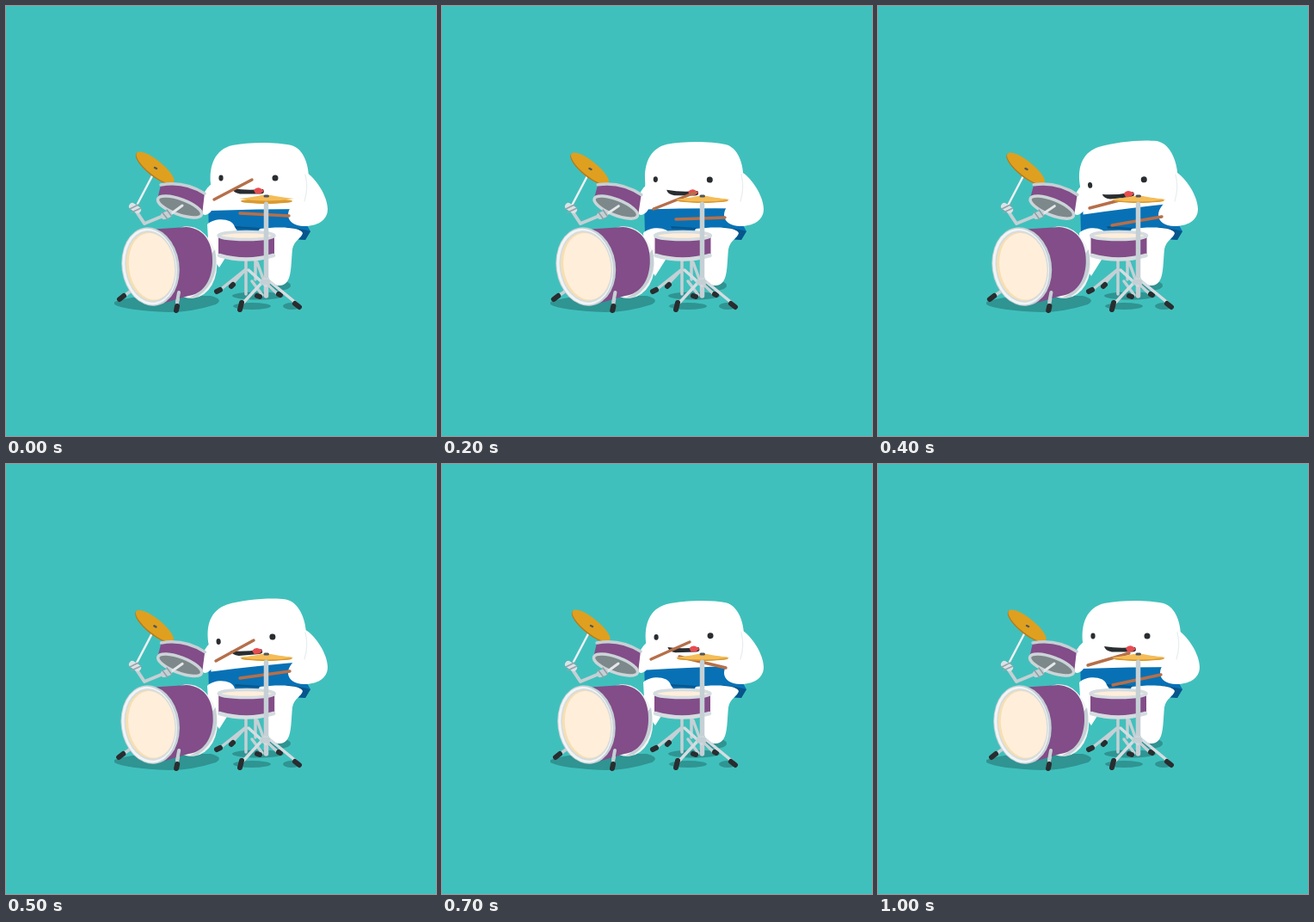
Write an HTML page that moves like this. It is 500 by 500 pixels and loops after 1.1 s.

```html
<!DOCTYPE html>
<html lang="en">
<head>
<meta charset="utf-8">
<title>Drummer</title>
<style>
  html, body { margin: 0; width: 100%; height: 100%; overflow: hidden; background: #40c0bc; }
  svg { display: block; width: 100vw; height: 100vh; }
  .line { fill: none; stroke-linecap: round; stroke-linejoin: round; }
  .steel { stroke: #c5d0d5; }
  .foot { stroke: #292d30; stroke-width: 6; }
  .stick { stroke: #b66f49; stroke-width: 3.4; }
  .fold { stroke: #e8eef0; stroke-width: 1.3; }
  .shell { fill: #824d88; }
</style>
</head>
<body>
<svg viewBox="0 0 500 500">
  <g fill="#2f9492">
    <path d="M126 344Q150 335 200 337H238Q254 341 244 347Q216 356 190 356Q138 354 126 347Z"/>
    <ellipse cx="293" cy="337" rx="30" ry="4.5"/>
    <ellipse cx="317" cy="325" rx="14" ry="6"/>
    <ellipse cx="286" cy="349" rx="22" ry="4"/>
    <ellipse cx="332" cy="349" rx="10" ry="4"/>
  </g>

  <g id="shorts">
    <path fill="#0871b5" d="M235 228H335L354 262L348 272L310 270L236 266Z"/>
    <path fill="#07568b" d="M326 257Q344 259 354 262L348 272L339 271Q345 265 326 260ZM266 256L296 258V260L267 259Z"/>
  </g>
  <path fill="#fff" d="M295 259C318 256 343 257 345 264C344 270 335 272 333 283C331 303 333 325 318 325C307 325 304 317 302 300L290 270Z"/>
  <path id="thigh" fill="#fff" d="M234 254C242 246 263 246 266 257L272 266L248 304L236 288Z"/>

  <path id="head" fill="#fff" d="M238 207C236 185 243 167 263 162C284 158 314 158 332 162C346 166 353 185 352 205L348 236Q290 236 238 238Z"/>
  <path fill="#fff" d="M241 206C231 211 226 224 226 238C228 245 235 244 239 238L252 213Z"/>
  <g id="face">
    <g id="open" fill="#292d30">
      <ellipse cx="250" cy="200" rx="2.6" ry="3.4"/>
      <ellipse cx="313" cy="200" rx="3.5" ry="3.5"/>
    </g>
    <path id="shut" class="line" stroke="#292d30" stroke-width="2" d="M247 200L253 201M309 200L317 201"/>
    <path fill="#292d30" d="M263 212Q280 215 299 213Q302 218 296 218.500H272Q264 217 263 212Z"/>
    <path fill="#e64c50" d="M288 214Q293 208 300 215L296 218H290Z"/>
  </g>
  <g id="arm">
    <path fill="#fff" d="M347 192C361 200 374 222 374 236C374 250 361 256 347 256C335 256 328 250 328 243C328 235 335 229 341 223Z"/>
    <path class="line fold" d="M348 196Q352 211 347 227"/>
  </g>
  <path id="left" class="line stick"/>
  <path id="right" class="line stick"/>

  <g id="crash">
    <path class="line" stroke="#eef1f3" stroke-width="2.5" d="M174 190L153 230"/>
    <g transform="rotate(39 173.500 188)">
      <ellipse cx="173.500" cy="189" rx="27.500" ry="9" fill="#b87918"/>
      <ellipse cx="173.500" cy="188" rx="27.500" ry="8.500" fill="#dfa01f"/>
    </g>
    <path class="line" stroke="#50585c" stroke-width="2.5" d="M173 188L175 189"/>
  </g>
  <path class="line steel" stroke-width="4" d="M149 235L161 253L190 241"/>
  <path class="line" stroke="#dce2e5" stroke-width="8" d="M147 233L153 237"/>
  <path class="line" stroke="#96a3aa" stroke-width="1.5" d="M144 236L154 231M146 240L157 235"/>

  <g id="tom">
    <path class="shell" d="M180 208Q207 203 231 217L228 243L176 225Z"/>
    <path class="line steel" stroke-width="3.5" d="M180 208Q207 203 231 218"/>
    <ellipse cx="202" cy="233.500" rx="27" ry="9" transform="rotate(20 202 233.500)" fill="#7d888b" stroke="#ccd4d8" stroke-width="3.5"/>
    <path class="line" stroke="#e4e8ea" stroke-width="3" d="M205 232L190 243"/>
    <path class="line steel" stroke-width="8" d="M184 244L189 242"/>
    <path class="line" stroke="#929fa5" stroke-width="1.5" d="M181 239L188 248M187 237L193 245"/>
  </g>

  <g id="kick">
    <path class="line steel" stroke-width="4" d="M147 330L136 338M202 328L199 346"/>
    <path class="line foot" d="M137 337L132 341M199 349L198 354"/>
    <ellipse cx="213" cy="298" rx="32" ry="42" transform="rotate(-8 213 298)" fill="#f2f4f5"/>
    <path fill="#c5d0d5" d="M243 283Q250 319 223 338L212 340Q242 326 239 288Z"/>
    <path class="shell" d="M165 260L210 257C232 259 241 277 240 299C239 321 228 335 212 337L175 348Z"/>
    <g transform="rotate(-8 168 303)">
      <ellipse cx="168" cy="303" rx="33.500" ry="46" fill="#c5d0d5"/>
      <ellipse cx="167" cy="303" rx="31.500" ry="44.500" fill="#f2f4f5"/>
      <ellipse cx="168" cy="303" rx="29.500" ry="42" fill="#d5dce0"/>
      <ellipse cx="168" cy="303" rx="28" ry="40" fill="#f7dfb0"/>
      <ellipse cx="169.500" cy="303" rx="26.500" ry="39" fill="#ffeeda"/>
    </g>
    <path class="line steel" stroke-width="4" d="M201 333L199 344"/>
  </g>

  <path class="line steel" stroke-width="3.5" d="M279 296V335M290 296V318M279 306L249 330M279 306L264 322M292 298L300 320L316 335M286 320L298 336"/>
  <path class="line foot" d="M249 330L245 332M264 324L262 326M317 335L319 336M292 337L295 338"/>
  <g id="snare">
    <path class="shell" d="M247 268H312V290Q280 299 247 290Z"/>
    <ellipse cx="279.500" cy="267" rx="32.500" ry="4.500" fill="#ffeeda" stroke="#d5dce0" stroke-width="3.5"/>
    <path class="line" stroke="#d5dce0" stroke-width="4.500" d="M248 290Q279 299 311 290"/>
  </g>
  <path class="line steel" stroke-width="5.500" d="M302.500 231V337"/>
  <path class="line" stroke="#d5dde1" stroke-width="3.5" d="M301 318L275 346M304 318L338 346M282 307L302 325"/>
  <path class="line steel" stroke-width="7" d="M299 321H304"/>
  <path class="line foot" d="M274 345L272 353M336 346L341 350"/>
  <ellipse id="under" cx="303" cy="226" rx="30" ry="3" fill="#d99a30"/>
  <path id="over" fill="#f5bd58" d="M271 225Q289 223 297 221H308Q317 223 335 225Q303 230 271 225Z"/>
  <path class="line" stroke="#4e575b" stroke-width="3" d="M301 221H304.500"/>
  <path class="line steel" stroke-width="5" d="M302.500 230V232"/>
</svg>
<script>
  const el = id => document.getElementById(id);
  const move = (id, value) => el(id).setAttribute('transform', value);

  // tilt, head x, head y, face y, arm x, drum hit, left stick, right stick
  const poses = [
    [0, 0, 0, 0, 0, 0, 'M242 225L286 202', 'M272 241L329 244'],
    [0, -1, 0, 1, 0, .4, 'M244 231L291 210', 'M272 245L329 245'],
    [.5, -2, -1, 2, 0, 1, 'M246 236L294 217', 'M272 248L329 246'],
    [-6, 0, -2, 3, -3, 0, 'M242 226Q260 219 298 219', 'M272 251L330 247'],
    [-6, 0, -2, 3, -2, 1, 'M246 235L292 223', 'M272 255L330 245'],
    [-5, 0, -2, 2, 0, .4, 'M244 229L288 205', 'M272 249L330 241'],
    [-3.5, 0, -1, 1, 2, 0, 'M242 222L282 189', 'M272 243L329 238'],
    [-1.5, 0, 0, 0, 0, 0, 'M243 227L288 207', 'M276 224L330 237'],
    [0, 0, 0, 0, -2, 0, 'M244 232L292 220', 'M281 207L330 236'],
    [0, 0, 0, 0, -1, .4, 'M244 233L292 220', 'M275 237L329 242'],
    [0, 0, 0, 0, 0, 0, 'M244 234L292 220', 'M273 257L329 245']
  ];

  function draw(now) {
    const step = Math.floor(now % 1100 / 100);
    const [tilt, headX, headY, faceY, armX, hit, left, right] = poses[step];
    const turn = `rotate(${tilt} 300 235)`;
    const blink = step === 3;
    const lift = step % 6 ? 0 : 1;
    move('head', `translate(${headX} ${headY}) ${turn}`);
    move('face', `translate(${headX} ${faceY}) ${turn}`);
    move('arm', `translate(${armX})`);
    move('thigh', `translate(0 ${10 * hit})`);
    el('open').style.display = blink ? 'none' : '';
    el('shut').style.display = blink ? '' : 'none';
    el('left').setAttribute('d', left);
    el('right').setAttribute('d', right);
    move('kick', `translate(190 300) scale(${1 + hit * .035} 1) translate(-190 -300)`);
    move('crash', `translate(${-1.5 * hit} ${hit})`);
    move('tom', `rotate(${hit * 2} 187 242)`);
    move('snare', `translate(${hit * .5})`);
    move('over', `translate(0 ${-lift})`);
    move('under', `translate(0 ${lift})`);
    requestAnimationFrame(draw);
  }
  draw(performance.now());
</script>
</body>
</html>
```
